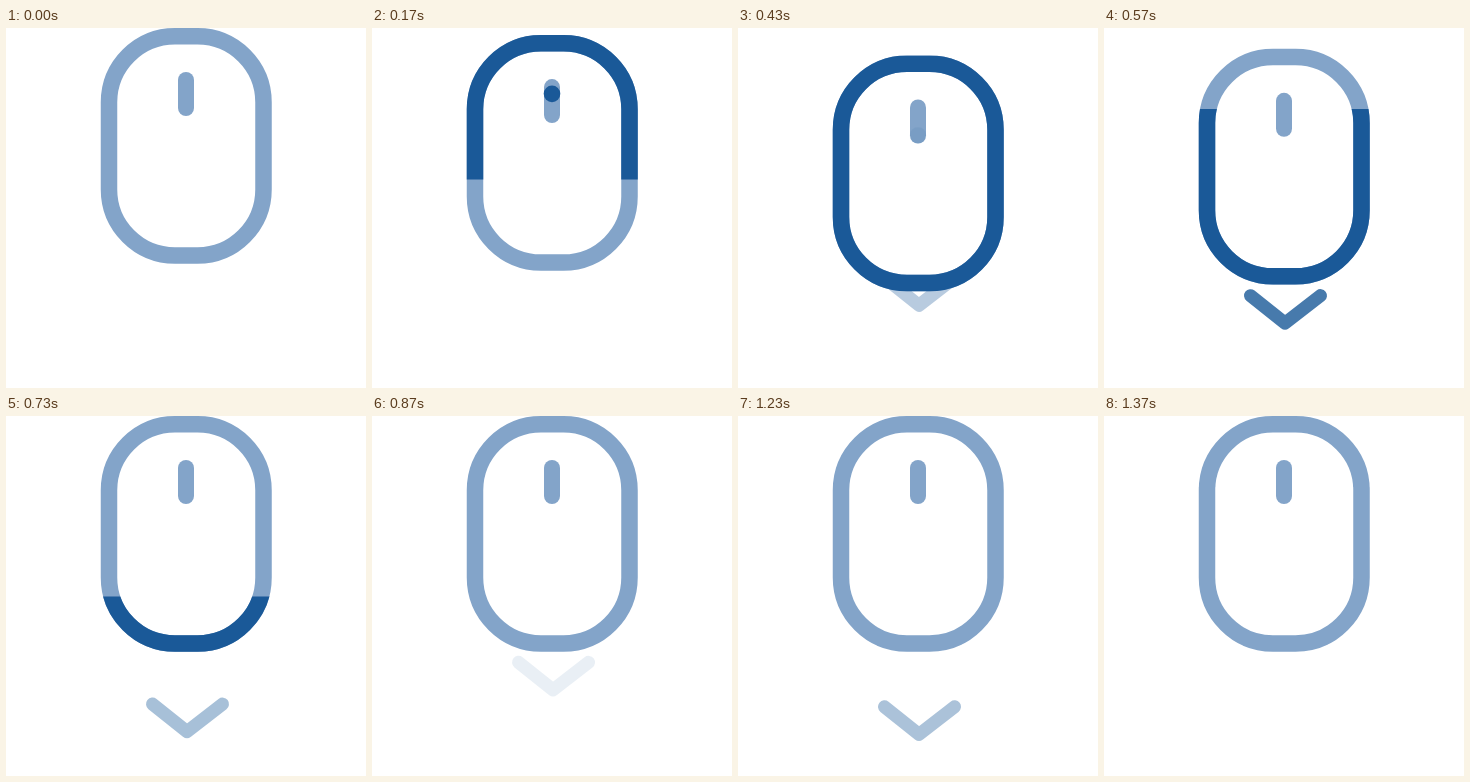
Recreate the animation shown at these times as an HTML page. Size 360x360 px, loop 1430 ms.

```html
<!DOCTYPE html>
<html lang="en">
<head>
<meta charset="utf-8">
<title>Scroll hint</title>
<style>
  html, body { margin: 0; width: 100%; height: 100%; overflow: hidden; background: #fff; }
  svg { display: block; width: 360px; height: 360px; }
</style>
</head>
<body>
<svg viewBox="0 0 360 360" fill="none">
  <defs>
    <clipPath id="clip"><rect id="band" x="90" width="180"/></clipPath>
    <rect id="ring" x="103" y="8.25" width="154.5" height="219.25" rx="66" stroke-width="16.5"/>
  </defs>
  <path id="arrow" d="M146.5 -27.5L181 0L216.5 -27.5" stroke="#1a5998" stroke-width="13"
        stroke-linecap="round" stroke-linejoin="round"/>
  <g id="mouse">
    <use href="#ring" stroke="#83a4c9"/>
    <g clip-path="url(#clip)"><use href="#ring" stroke="#1a5998"/></g>
    <rect x="172" y="44" width="16" height="44" rx="8" fill="#83a4c9"/>
    <circle id="dot" cx="180" r="8.3" fill="#1a5998"/>
  </g>
</svg>
<script>
const LOOP = 1430;
const HEIGHT = 237;
const [mouse, band, dot, arrow] = ['mouse', 'band', 'dot', 'arrow'].map(id => document.getElementById(id));

const ramp = (t, start, end) => Math.min(1, Math.max(0, (t - start) / (end - start)));
const ease = (t, start, end) => (1 - Math.cos(Math.PI * ramp(t, start, end))) / 2;
const set = (el, attrs) => { for (const key in attrs) el.setAttribute(key, attrs[key]); };

// Arrow passes: start, end, peak opacity, y of the tip at start and end
const passes = [
  [343, 840, 0.87, 266, 329.5],
  [840, 1350, 0.78, 270, 333]
];

function draw(now) {
  const t = now % LOOP;

  const drop = 28 * (ease(t, 20, 470) - ease(t, 495, 720));
  set(mouse, { transform: `translate(0 ${drop})` });

  const top = HEIGHT * ramp(t, 491, 806);
  const bottom = HEIGHT * ramp(t, 20, 268);
  set(band, { y: top, height: Math.max(0, bottom - top) });

  set(dot, {
    cy: 52 + 28 * ease(t, 60, 400),
    opacity: ramp(t, 20, 130) * (1 - ramp(t, 230, 450))
  });

  const [start, end, peak, from, to] = passes[t < 840 ? 0 : 1];
  const p = ramp(t, start, end);
  set(arrow, {
    transform: `translate(0 ${from + (to - from) * p})`,
    opacity: peak * (1 - Math.abs(2 * p - 1))
  });

  requestAnimationFrame(() => draw(performance.now()));
}
draw(0);
</script>
</body>
</html>
```
